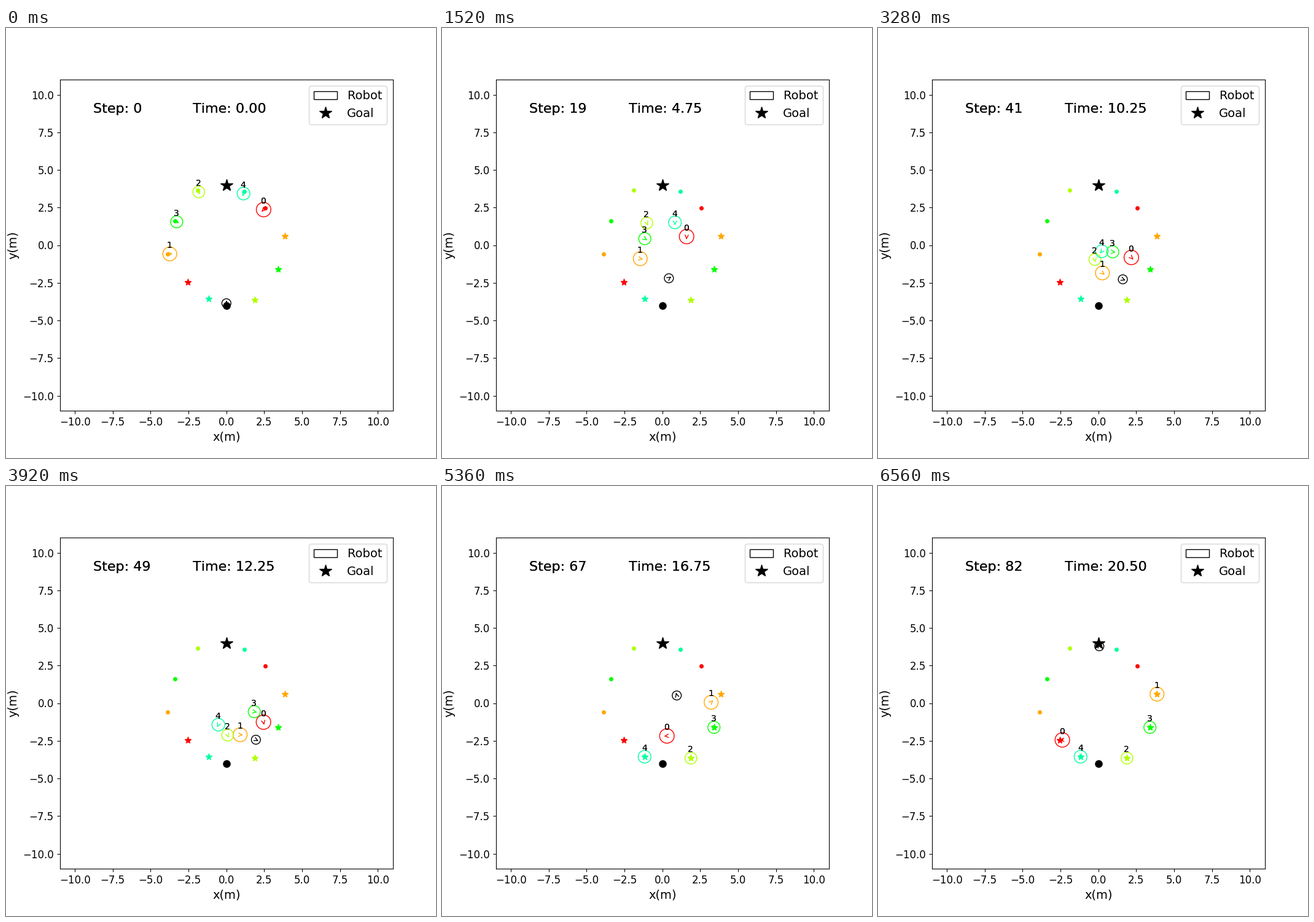
A matplotlib script for the animation above (6.64 s loop, 700x700 px).

```python
import numpy as np
import matplotlib.pyplot as plt
from matplotlib.animation import FuncAnimation
from matplotlib.lines import Line2D
from matplotlib.patches import ArrowStyle, Circle, FancyArrowPatch

plt.rcParams["text.kerning_factor"] = 6

STEPS = 83
STEP_MS = 80
DT = 0.25
CRUISE = 0.14  # metres per step when setting off
ARROW_LEN = 0.3
VIA_STEPS = (19, 32, 49, 58, 67)


def travel(start, via, arrival):
    """Leave start heading for the opposite point, bend through the via points
    on a monotone cubic, then rest at the goal from the arrival step on."""
    start = np.array(start, float)
    knots = np.array([-1, *VIA_STEPS[:len(via)], arrival])
    pts = np.vstack([start, via, -start])
    h = np.diff(knots)[:, None]
    slope = np.diff(pts, axis=0) / h

    # harmonic mean of neighbouring slopes, flat where the direction flips
    a, b = slope[:-1], slope[1:]
    w1, w2 = 2 * h[1:] + h[:-1], h[1:] + 2 * h[:-1]
    same = a * b > 0
    inner = np.where(same, (w1 + w2) * a * b / np.where(same, w1 * b + w2 * a, 1), 0)
    heading = -start / np.hypot(*start)
    m = np.vstack([CRUISE * heading, inner, slope[-1]])

    t = np.minimum(np.arange(STEPS), arrival)
    k = np.clip(np.searchsorted(knots, t, side="right") - 1, 0, len(h) - 1)
    s = (t - knots[k])[:, None] / h[k]
    ease = s * s * (3 - 2 * s)
    return (pts[k] * (1 - ease) + pts[k + 1] * ease
            + h[k] * s * (1 - s) * (m[k] * (1 - s) - m[k + 1] * s))


fig, ax = plt.subplots(figsize=(7, 7), dpi=100)
ax.tick_params(labelsize=12)
ax.set_xlim(-11, 11)
ax.set_ylim(-11, 11)
ax.set_xlabel("x(m)", fontsize=14)
ax.set_ylabel("y(m)", fontsize=14)


def marker(pos, shape, color, size):
    line = Line2D([pos[0]], [pos[1]], color=color, marker=shape,
                  linestyle="None", markersize=size)
    return ax.add_artist(line)


def bold_text(x, y, s, **kw):
    """Text painted twice, which darkens its edges."""
    label = ax.text(x, y, s, color="black", **kw)
    return ax.add_artist(label)


class Agent:
    def __init__(self, radius, start, arrival, via, color, name=None):
        big = name is None
        self.goal = marker((-start[0], -start[1]), "*", color, 15 if big else 8)
        marker(start, "o", color, 8 if big else 4)
        self.pos = travel(start, via, arrival)
        move = np.diff(self.pos, axis=0)
        move = np.vstack([move[:1], move])
        self.angle = np.arctan2(move[:, 1], move[:, 0])
        self.body = ax.add_artist(Circle(self.pos[0], radius, fill=False, color=color))
        style = ArrowStyle("->", head_length=4, head_width=2)
        self.arrow = ax.add_artist(
            FancyArrowPatch((0, 0), (1, 1), color=color, arrowstyle=style))
        self.label = bold_text(0, 0, name or "", fontsize=10)

    def place(self, step):
        x, y = self.pos[step]
        a = self.angle[step]
        self.body.center = x, y
        self.arrow.set_positions((x, y), (x + ARROW_LEN * np.cos(a),
                                          y + ARROW_LEN * np.sin(a)))
        self.label.set_position((x - 0.2, y + 0.4))


hue = plt.get_cmap("hsv", 10)
robot = Agent(0.3, (0, -4), 83,
              [(0.43, -2.20), (1.00, -2.08), (1.95, -2.43), (1.52, -1.55), (0.95, 0.51)],
              "black")
agents = [
    robot,
    Agent(0.48, (2.555, 2.46), 83,
          [(1.60, 0.57), (1.80, -0.33), (2.45, -1.26), (2.50, -1.90), (0.30, -2.18)],
          hue(0), "0"),
    Agent(0.46, (-3.873, -0.60), 74,
          [(-1.46, -0.90), (-0.34, -1.37), (0.91, -2.10), (2.29, -1.02), (3.22, 0.06)],
          hue(1), "1"),
    Agent(0.39, (-1.885, 3.655), 66,
          [(-1.03, 1.47), (-0.51, 0.35), (0.08, -2.12)], hue(2), "2"),
    Agent(0.40, (-3.405, 1.61), 66,
          [(-1.16, 0.43), (-0.04, -0.31), (1.84, -0.57)], hue(3), "3"),
    Agent(0.42, (1.175, 3.56), 67,
          [(0.83, 1.51), (0.88, 0.61), (-0.53, -1.43)], hue(4), "4"),
]

ax.legend([robot.body, robot.goal], ["Robot", "Goal"], fontsize=14, loc="upper right")
step_text = bold_text(0.1, 0.9, "", fontsize=16, transform=ax.transAxes)
time_text = bold_text(0.4, 0.9, "", fontsize=16, transform=ax.transAxes)


def update(step):
    for agent in agents:
        agent.place(step)
    step_text.set_text(f"Step: {step}")
    time_text.set_text(f"Time: {step * DT:.2f}")
    return []


anim = FuncAnimation(fig, update, frames=STEPS, interval=STEP_MS,
                     init_func=lambda: update(0), repeat=True, repeat_delay=0)
plt.show()
```
